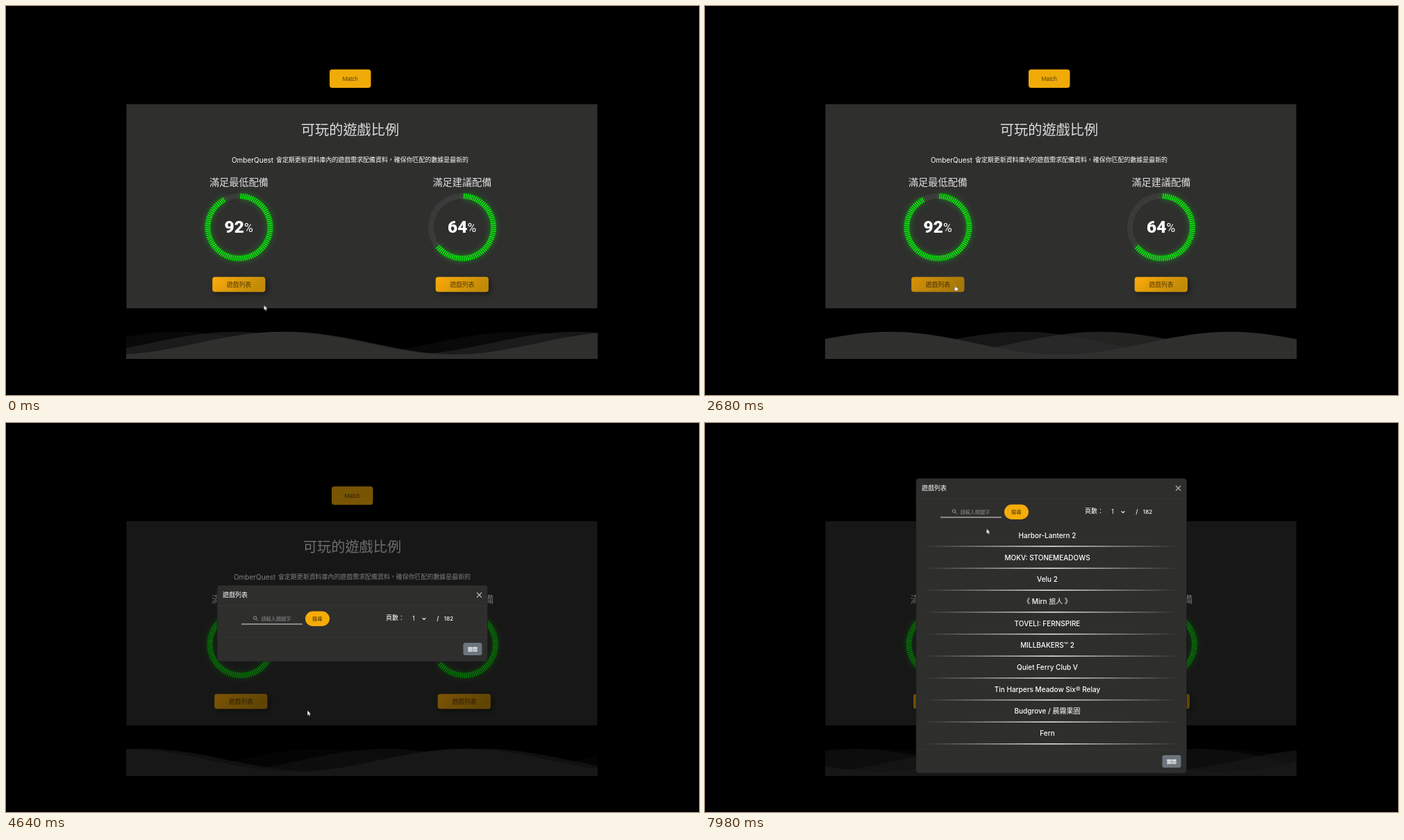
Write an HTML page that moves like this. It is 998x561 px and loops after 8 s.

```html
<!DOCTYPE html>
<html lang="zh-Hant">
<head>
<meta charset="utf-8">
<title>遊戲比例</title>
<style>
html, body { margin: 0; width: 100%; height: 100%; overflow: hidden; background: #000; }
svg { display: block; width: 100%; height: 100%; }
text { font-family: Inter, "Noto Sans CJK TC", "Noto Sans CJK", sans-serif; text-anchor: middle; fill: #fff; }
.digits { font-family: Roboto, sans-serif; }
.plain { font-family: "Liberation Sans", sans-serif; }

.anim { animation: 8s linear infinite; }
.wave { animation-name: drift; }
@keyframes drift {
  from { transform: translateX(var(--from)); }
  to { transform: translateX(var(--to)); }
}

/* the scrollbar disappears when the dialog opens */
.page { animation-name: nudge; animation-timing-function: step-end; }
@keyframes nudge { 0% { transform: none; } 50.25% { transform: translateX(3px); } 100% { transform: translateX(3px); } }

.shadow { filter: drop-shadow(3px 3px 4px rgba(0,0,0,.45)); }
.press { transform-box: fill-box; transform-origin: center; animation-name: press; }
@keyframes press {
  0%, 29.2% { transform: none; filter: drop-shadow(3px 3px 4px rgba(0,0,0,.45)); }
  30.5%, 49.5% { transform: none; filter: brightness(.86) drop-shadow(0 0 0 rgba(0,0,0,0)); }
  50.2%, 50.8% { transform: scale(.97); filter: brightness(.83) drop-shadow(0 0 0 rgba(0,0,0,0)); }
  53%, 100% { transform: none; filter: drop-shadow(3px 3px 4px rgba(0,0,0,.45)); }
}

.shade { animation-name: shade; }
@keyframes shade { 0%, 52.25% { opacity: 0; } 54.2%, 100% { opacity: .5; } }

.modal { animation-name: drop; }
@keyframes drop {
  0%, 52.25% { opacity: 0; transform: translateY(-25px); animation-timing-function: ease-out; }
  56%, 100% { opacity: 1; transform: none; }
}
.box, .head, .foot, .list { animation-timing-function: step-end; }
.box { animation-name: grow; }
.head { animation-name: rise; }
.foot { animation-name: sink; }
.list { animation-name: reveal; }
@keyframes grow { 0% { y: 234px; height: 110px; } 63.75%, 100% { y: 80px; height: 425px; } }
@keyframes rise { 0% { transform: translateY(154px); } 63.75%, 100% { transform: none; } }
@keyframes sink { 0% { transform: translateY(-162px); } 63.75%, 100% { transform: none; } }
@keyframes reveal { 0% { visibility: hidden; } 63.75%, 100% { visibility: visible; } }

.cursor { animation-name: point; animation-timing-function: ease-in-out; }
@keyframes point {
  0%, 26% { transform: translate(371.5px, 431.5px); }
  30%, 50.6% { transform: translate(359.5px, 402px); }
  57%, 65% { transform: translate(434px, 414.5px); }
  80%, 86.5% { transform: translate(517px, 307px); }
  96.5%, 100% { transform: translate(405.5px, 152.5px); }
}
.arrow, .hand { animation-timing-function: step-end; }
.arrow { animation-name: arrow; }
.hand { animation-name: hand; }
@keyframes arrow { 0% { opacity: 1; } 29.25% { opacity: 0; } 50.25%, 100% { opacity: 1; } }
@keyframes hand { 0% { opacity: 0; } 29.25% { opacity: 1; } 50.25%, 100% { opacity: 0; } }
</style>
</head>
<body>
<svg viewBox="0 0 998 561" xmlns="http://www.w3.org/2000/svg">
  <defs>
    <linearGradient id="gold" x1="0" y1="0" x2="1" y2=".3">
      <stop stop-color="#fcab0b"/><stop offset="1" stop-color="#c18a07"/>
    </linearGradient>
    <linearGradient id="rule">
      <stop stop-color="#fff" stop-opacity="0"/><stop offset=".5" stop-color="#fff"/><stop offset="1" stop-color="#fff" stop-opacity="0"/>
    </linearGradient>
    <filter id="glow" x="-30%" y="-30%" width="160%" height="160%">
      <feDropShadow dx="0" dy="0" stdDeviation="4" flood-color="#0f0" flood-opacity=".6"/>
    </filter>
    <clipPath id="sea"><rect x="173.5" y="469.5" width="678" height="39"/></clipPath>
  </defs>

  <rect width="998" height="561"/>
  <rect x="173.5" y="141.5" width="678" height="294.5" fill="#2f2f2e"/>
  <g id="waves" clip-path="url(#sea)" fill="#2f2f2e"></g>
  <g id="page" class="anim page"></g>
  <rect class="anim shade" width="998" height="561"/>

  <g class="anim modal">
    <rect class="anim box" x="304" y="80" width="389.5" height="425" rx="4" fill="#2e2e2d" stroke="#1c1c1c" stroke-width=".6"/>
    <g id="head" class="anim head">
      <path d="M304 109.5h389.5" stroke="#383838" stroke-width=".7"/>
      <path d="M678 90.5l7 7m0-7l-7 7" stroke="#b4b4b4" stroke-width="1.2"/>
      <path d="M339 136h88" stroke="#e4e4e4"/>
      <g fill="none" stroke="#999" stroke-width="1"><circle cx="358.6" cy="127" r="2.2"/><path d="M360.3 128.7l2.6 2.6"/></g>
      <rect x="431" y="117.5" width="35" height="21.5" rx="10.75" fill="#f5ab08"/>
      <path d="M599.6 127.2l2.4 2.3 2.4-2.3" fill="none" stroke="#fff" stroke-width="1.1"/>
    </g>
    <g id="list" class="anim list"></g>
    <g id="foot" class="anim foot">
      <path d="M304 471h389.5" stroke="#383838" stroke-width=".7"/>
      <rect x="658.5" y="479" width="27" height="18" rx="3" fill="#6c757d"/>
    </g>
  </g>

  <g class="anim cursor">
    <path class="anim arrow" d="M0 0v7.2l1.7-1.5 1.2 2.5 1.2-.6-1.1-2.4h2.2z" fill="#fff" stroke="#222" stroke-width=".4"/>
    <path class="anim hand" d="M.2.6q.6-.9 1.2 0v3l2.7.6q1 .3.8 1.4l-.6 3.2h-3.3l-2.4-3.2q.1-.9 1.6.3z" fill="#fff" stroke="#222" stroke-width=".4"/>
  </g>
</svg>
<script>
const $ = id => document.getElementById(id);

function add(parent, tag, attrs, content) {
  const node = document.createElementNS('http://www.w3.org/2000/svg', tag);
  for (const key in attrs) node.setAttribute(key, attrs[key]);
  if (content) node.textContent = content;
  return parent.appendChild(node);
}

// y is the optical middle of the line
function label(parent, x, y, size, content, attrs = {}) {
  return add(parent, 'text', { x, y: y + size * .37, 'font-size': size, ...attrs }, content);
}

// Waves: crest position at the start, speed in px/s, opacity; back to front
const period = 490;
let shape = 'M-1470 520';
for (let x = -1470; x <= 1960; x += 10)
  shape += `L${x} ${(486.2 - 16.4 * Math.cos(2 * Math.PI * x / period)).toFixed(2)}`;
shape += 'V520z';
for (const [start, speed, opacity] of [[405, 61, .7], [248, -61, .2], [330, 47, .5], [398, -49, 1]]) {
  add($('waves'), 'path', {
    d: shape, opacity, class: 'anim wave',
    style: `--from:${start}px;--to:${start + speed * 8}px`
  });
}

// Page
const page = $('page');
add(page, 'rect', { x: 466, y: 91.5, width: 59.5, height: 26.5, rx: 4, fill: '#f0ab08' });
label(page, 495.7, 104.5, 8.3, 'Match', { class: 'plain', style: 'fill:#5c430a' });
label(page, 495.5, 179, 20.2, '可玩的遊戲比例', { 'font-weight': 500, style: 'fill:#dedede' });
label(page, 355, 222, 10, 'OmberQuest');
label(page, 527.5, 222, 8.95, '會定期更新資料庫內的遊戲需求配備資料，確保你匹配的數據是最新的', { 'font-weight': 500 });

function gauge(cx, title, percent, buttonClass) {
  label(page, cx, 253.5, 14.2, title, { style: 'fill:#dcdcdc' });
  const idle = add(page, 'g', { stroke: '#484848', 'stroke-width': 1.4 });
  const lit = add(page, 'g', { stroke: '#08f00c', 'stroke-width': 1.6, filter: 'url(#glow)' });
  for (let i = 1; i <= 100; i++) {
    add(i <= percent ? lit : idle, 'path', { d: `M${cx} 270v8`, transform: `rotate(${i * 3.6} ${cx} 319)` });
  }
  const value = add(page, 'text', { x: cx - .3, y: 327.3, class: 'digits' });
  add(value, 'tspan', { 'font-size': 24.5, 'font-weight': 900 }, String(percent));
  add(value, 'tspan', { 'font-size': 17.5, dy: -1 }, '%');

  const button = add(page, 'g', { class: buttonClass });
  add(button, 'rect', { x: cx - 38, y: 391, width: 75.5, height: 21, rx: 3, fill: 'url(#gold)', stroke: '#d99b18', 'stroke-width': .7 });
  label(button, cx, 401.3, 8.9, '遊戲列表', { style: 'fill:#52390a' });
}
gauge(335.5, '滿足最低配備', 92, 'anim press');
gauge(657, '滿足建議配備', 64, 'shadow');

// Dialog
const head = $('head');
label(head, 330, 94, 9, '遊戲列表', { 'font-weight': 500 });
label(head, 389, 128, 7.2, '請輸入關鍵字', { style: 'fill:#8a8a8a' });
label(head, 448.3, 128, 7.2, '搜尋', { 'font-weight': 500, style: 'fill:#3a2a05' });
label(head, 560.5, 126.5, 9, '頁數：', { 'font-weight': 500 });
label(head, 587, 128, 8.5, '1');
label(head, 622, 128, 9, '/', { 'font-weight': 500 });
label(head, 637.5, 128, 8, '182', { 'font-weight': 500 });
label($('foot'), 672, 488.2, 7, '關閉', { 'font-weight': 700 });

const games = [
  'Harbor-Lantern 2', 'MOKV: STONEMEADOWS', 'Velu 2', '《 Mirn 旅人 》', 'TOVELI: FERNSPIRE',
  'MILLBAKERS™ 2', 'Quiet Ferry Club V', 'Tin Harpers Meadow Six® Relay', 'Budgrove / 晨霧果園', 'Fern'
];
games.forEach((name, i) => {
  const y = 162.2 + i * 31.67;
  label($('list'), 493, y, 10, name, { 'font-weight': 500 });
  add($('list'), 'rect', { x: 315, y: y + 14.9, width: 367, height: 1.4, fill: 'url(#rule)' });
});
</script>
</body>
</html>
```
